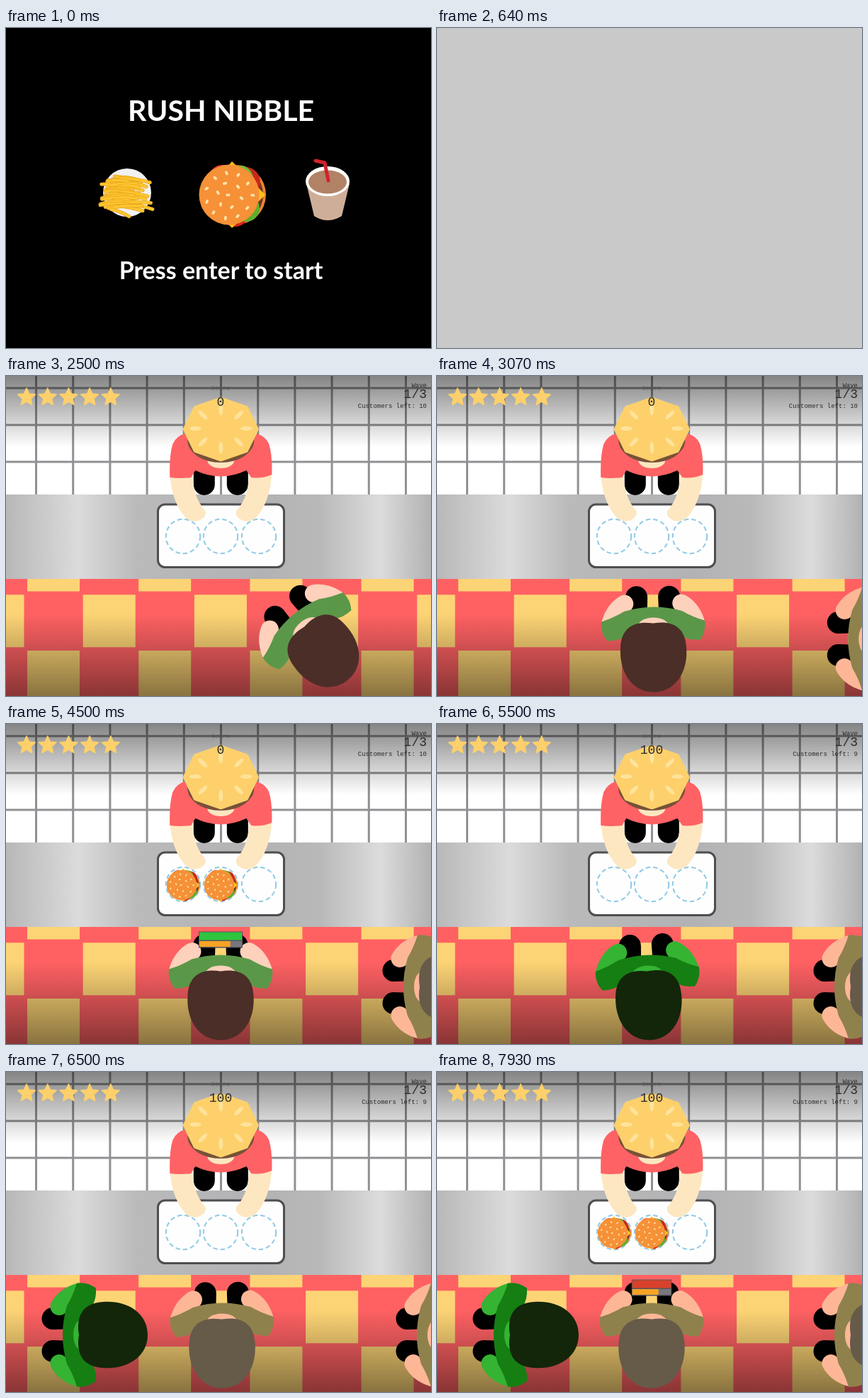
An HTML page that plays this animation: 600x451 px, repeating every 8000 ms.

```html
<!DOCTYPE html>
<html lang="en">
<head>
<meta charset="utf-8">
<title>Burger counter</title>
<style>
html, body { margin: 0; width: 100%; height: 100%; overflow: hidden; background: #000; }
svg { display: block; width: 600px; height: 451px; }
.head { font-family: Lato, sans-serif; font-weight: 700; fill: #fff; text-anchor: middle; }
.hud { font-family: "Liberation Mono", monospace; fill: #2c2c2c; font-size: 9px; }
.hud .big { font-size: 18px; }
.right { text-anchor: end; }
.mid { text-anchor: middle; }
.skin { fill: var(--skin); }
.arm { stroke: var(--skin); stroke-width: 25; stroke-linecap: round; fill: none; }
.shirt { fill: var(--shirt); }
.hair { fill: var(--hair); }
</style>
</head>
<body>
<svg viewBox="0 0 600 451">
  <defs>
    <linearGradient id="steel">
      <stop offset="0" stop-color="#b8b8b9"/>
      <stop offset=".17" stop-color="#dbdbdc"/>
      <stop offset=".31" stop-color="#bababb"/>
      <stop offset=".6" stop-color="#b2b2b4"/>
      <stop offset=".74" stop-color="#b9b9ba"/>
      <stop offset=".88" stop-color="#dcdcdd"/>
      <stop offset="1" stop-color="#b2b2b3"/>
    </linearGradient>
    <linearGradient id="topShade" x2="0" y2="1">
      <stop offset="0" stop-opacity=".48"/>
      <stop offset="1" stop-opacity="0"/>
    </linearGradient>
    <linearGradient id="floorShade" x2="0" y2="1">
      <stop offset="0" stop-opacity="0"/>
      <stop offset="1" stop-opacity=".46"/>
    </linearGradient>
    <clipPath id="floorClip"><path d="M0 286H600V451H0Z"/></clipPath>

    <g id="burger">
      <circle cx="6" r="42" fill="#e88634"/>
      <circle cx="3" r="41" fill="#6d3520"/>
      <circle cx="-14" cy="-24" r="18" fill="#d8261f"/>
      <circle cx="19" cy="-18" r="21" fill="#c9281d"/>
      <circle cx="4" cy="25" r="20" fill="#d8261f"/>
      <circle cx="11" cy="-22" r="19" fill="#6cc235"/>
      <circle cx="20" cy="19" r="19" fill="#5fae2e"/>
      <path d="M0-47L47 0L0 47L-40 0Z" fill="#ffbe1e"/>
      <circle cx="-4" r="42.5" fill="#f69137"/>
      <g id="seeds" stroke="#fde3a8" stroke-width="3.6" stroke-linecap="round"/>
    </g>

    <g id="fries">
      <circle r="34" fill="#f1f1f3"/>
      <g id="sticks" fill="none" stroke-linecap="round"/>
    </g>

    <g id="drink">
      <path d="M-30-13L-19 33Q0 45 20 33L31-13Z" fill="#cfae99"/>
      <ellipse cy="-16" rx="31" ry="21" fill="#fff"/>
      <ellipse cy="-15" rx="27" ry="16.500" fill="#b28266"/>
      <path d="M-17-45L-4-42L1-17" fill="none" stroke="#d2222b" stroke-width="5" stroke-linejoin="round" stroke-linecap="round"/>
    </g>

    <g id="guest">
      <path d="M-23-59L-24-28M23-59L24-28" stroke="#000" stroke-width="31" stroke-linecap="round"/>
      <path class="arm" d="M-40-50Q-54-42-60-24M40-50Q54-42 60-24"/>
      <path class="shirt" d="M-65 2Q-75-10-73-25Q-56-30-41-39Q0-51 41-39Q56-30 73-25Q75-10 66 2Q50 3 40-4L-40-4Q-50 3-65 2Z"/>
      <ellipse class="skin" cy="-19" rx="21" ry="11"/>
      <path class="hair" d="M0-22C25-26 45-18 46.500 12C49 46 31 75 0 75C-31 75-49 46-46.500 12C-45-18-25-26 0-22Z"/>
    </g>
  </defs>

  <g id="scene">
    <rect width="600" height="168" fill="#fff"/>
    <path id="grout" stroke="#919195" stroke-width="3"/>
    <rect width="600" height="100" fill="url(#topShade)"/>
    <rect y="167" width="600" height="119" fill="url(#steel)"/>
    <g clip-path="url(#floorClip)">
      <rect y="286" width="600" height="165" fill="#ff6163"/>
      <path id="checks" fill="#fdd475"/>
      <rect y="335" width="600" height="116" fill="url(#floorShade)"/>
    </g>

    <rect x="214.500" y="181" width="178" height="88.500" rx="10" fill="#fefefe" stroke="#4e4e51" stroke-width="3"/>
    <g id="slots" fill="none" stroke="#8fc9e6" stroke-width="2" stroke-dasharray="6.500 4"/>
    <g id="food"></g>

    <g transform="translate(303.300 0)">
      <path d="M-23.500 130V153M23.500 130V153" stroke="#000" stroke-width="30" stroke-linecap="round"/>
      <g id="arms" fill="#fde7c1">
        <path id="armL" d="M-72 136Q-70 176-51 198Q-43 207-32 204Q-19 199-22 190Q-40 170-40 136Z"/>
        <use href="#armL" transform="scale(-1 1)"/>
      </g>
      <path d="M-72 143Q-73 112-68 96Q-62 82-44 80H44Q62 82 68 96Q73 112 72 139Q58 145 43 143L36 133Q0 150-36 133L-42 143Q-58 145-72 143Z" fill="#ff6264"/>
      <ellipse cy="119" rx="19" ry="11" fill="#fde7c1"/>
      <ellipse cy="91" rx="47" ry="31" fill="#775138"/>
      <path id="hat" fill="#fdd06b" stroke="#fdd06b" stroke-width="5" stroke-linejoin="round"/>
      <g id="folds" fill="#ffe39b"></g>
    </g>

    <g id="stars" fill="#fdd06b" stroke="#fdd06b" stroke-linejoin="round"></g>
    <g class="hud">
      <text class="mid" x="303" y="20" fill-opacity=".3">Score</text>
      <text class="mid big" id="score" x="303" y="42">0</text>
      <text class="right" x="594" y="16">Wave</text>
      <text class="right big" x="594" y="31">1/3</text>
      <text class="right" id="left" x="594" y="45">Customers left: 10</text>
    </g>

    <g id="guests"></g>
    <g id="meter">
      <rect x="-31" y="-11.500" width="62" height="23" fill="#56565c"/>
      <rect id="mood" x="-30" y="-10.500" width="60" height="11"/>
      <rect x="-30" y="2" width="60" height="8" fill="#77777d"/>
      <rect id="wait" x="-30" y="2" height="8" fill="#f7a325"/>
    </g>
  </g>

  <rect id="blank" width="600" height="451" fill="#c9c9c9"/>
  <g id="title">
    <rect width="600" height="451"/>
    <text class="head" x="303.500" y="131" font-size="41">RUSH NIBBLE</text>
    <use href="#fries" x="171" y="232"/>
    <use href="#burger" x="319" y="235"/>
    <use href="#drink" x="454" y="232"/>
    <text class="head" x="303.500" y="354" font-size="34">Press enter to start</text>
  </g>
</svg>
<script>
const $ = id => document.getElementById(id);
const range = n => [...Array(n).keys()];

function add(parent, tag, attrs) {
  const el = document.createElementNS("http://www.w3.org/2000/svg", tag);
  for (const k in attrs) el.setAttribute(k, attrs[k]);
  return $(parent).appendChild(el);
}

function polygon(n, rx, ry, cx = 0, cy = 0, inner = 1) {
  return "M" + range(n).map(i => {
    const a = i / n * 2 * Math.PI, k = i % 2 ? inner : 1;
    return [cx + rx * k * Math.sin(a), cy - ry * k * Math.cos(a)].map(v => v.toFixed(1));
  }).join("L") + "Z";
}

let seed = 7;
const rand = () => (seed = seed * 16807 % 2147483647) / 2147483647;

// Static scenery
$("grout").setAttribute("d",
  range(12).map(i => `M${42.5 + i * 52.2} 0V167`).join("") +
  range(3).map(i => `M0 ${17 + i * 52}H600`).join(""));
$("checks").setAttribute("d", range(3).map(r => range(5).map(c =>
  `M${(r % 2 ? -48.5 : 30) + c * 157.2} ${229.5 + r * 78.7}h74v74h-74z`).join("")).join(""));
for (const x of [250, 303, 357]) add("slots", "circle", { cx: x, cy: 226, r: 24.2 });
for (const i of range(5))
  add("stars", "path", { d: polygon(10, 13, 13, 29 + i * 29.7, 30, .47), "stroke-width": 1.5 });

$("hat").setAttribute("d", polygon(8, 51, 43, 0, 75));
for (const i of range(8)) {
  const a = i * 45, t = a * Math.PI / 180;
  const x = 36 * Math.sin(t), y = 74 - 27 * Math.cos(t);
  add("folds", "ellipse", { rx: 3, ry: 8.5, transform: `translate(${x} ${y}) rotate(${a})` });
}

// Sesame seeds in rings, chips in slanted rows
for (const [n, r] of [[1, 3], [6, 17], [11, 32]])
  for (const i of range(n)) {
    const a = i / n * 6.283 + r, t = rand() * 3.14;
    const x = -4 + r * Math.cos(a), y = r * Math.sin(a);
    add("seeds", "path", { d: `M${x} ${y}l${2.6 * Math.cos(t)} ${2.6 * Math.sin(t)}` });
  }
for (const i of range(34)) {
  const y = -23 + i * 1.4, x = -38 + rand() * 30, w = 26 + rand() * 24, s = -5 + rand() * 17;
  const end = Math.min(w, 42 - x);
  const d = `M${x} ${y}q${end / 2} ${s / 2 - 3} ${end} ${s}`;
  add("sticks", "path", { d, stroke: "#e9a41e", "stroke-width": 5 });
  add("sticks", "path", { d, stroke: "#fdc62f", "stroke-width": 3.6 });
}

// Food on the tray: shape, x, shown from, shown until
const dishes = [
  ["burger", 250, 3920, 5490], ["burger", 303, 4340, 5490], ["drink", 357, 4920, 5490],
  ["burger", 250, 7350, 8000], ["burger", 303, 7775, 8000]
].map(([name, x, from, to]) => ({
  from, to, el: add("food", "use", { href: "#" + name, transform: `translate(${x} 227) scale(.5)` })
}));

const looks = {
  green: ["#fdd1bb", "#5b9749", "#4a2e27"],
  khaki: ["#fdb797", "#8f814c", "#665a49"],
  happy: ["#35b332", "#157f13", "#13260a"]
};

// Moves: start, duration, x from, x to, turn from, turn to
const guests = [
  { look: "green", happyAt: 5490, moves: [[2160, 1000, 606, 303, -90, 0], [5490, 705, 303, 125, 0, -90]] },
  { look: "khaki", moves: [[2575, 1000, 682, 606, -90, -90], [5580, 1000, 606, 303, -90, 0]] },
  { look: "khaki", moves: [[6000, 1000, 682, 606, -90, -90]] }
];
for (const g of guests) g.el = add("guests", "use", { href: "#guest" });

const meters = [
  { from: 3205, to: 5490, size: 1, rate: .21, color: "#31c43f" },
  { from: 6635, to: 8000, size: .91, rate: .25, color: "#d8412b" }
];

const easeOut = u => 1 - (1 - u) ** 2;
const show = (el, on) => el.setAttribute("visibility", on ? "inherit" : "hidden");

function drawGuest(g, t) {
  const [start, dur, x0, x1, r0, r1] = g.moves.findLast(m => t >= m[0]) || g.moves[0];
  const p = easeOut(Math.min(1, Math.max(0, (t - start) / dur)));
  g.el.setAttribute("transform",
    `translate(${x0 + (x1 - x0) * p} 370.500) rotate(${r0 + (r1 - r0) * p})`);
  const [skin, shirt, hair] = looks[t >= g.happyAt ? "happy" : g.look];
  g.el.style.cssText = `--skin:${skin};--shirt:${shirt};--hair:${hair}`;
}

function drawMeter(t) {
  const m = meters.find(m => t >= m.from && t < m.to);
  show($("meter"), m);
  if (!m) return;
  const pop = m.size * Math.min(1, .6 + (t - m.from) / 500);
  $("meter").setAttribute("transform", `translate(303 304) scale(${pop} 1)`);
  $("mood").setAttribute("fill", m.color);
  $("wait").setAttribute("width", 60 * (1 - m.rate * (t - m.from) / 1000));
}

function draw(t) {
  $("title").setAttribute("opacity", t < 499 ? 1 : t < 630 ? .5 : 0);
  show($("blank"), t < 2200);
  show($("scene"), t >= 2200);
  guests.forEach(g => drawGuest(g, t));
  dishes.forEach(d => show(d.el, t >= d.from && t < d.to));
  drawMeter(t);
  const served = t >= 5490;
  $("score").textContent = served ? 100 : 0;
  $("left").textContent = "Customers left: " + (served ? 9 : 10);
}

// Motion advances seven times a second
const step = 1000 / 7;
const begin = performance.now();
function tick() {
  const t = Math.max(0, performance.now() - begin) % 8000;
  draw(t < 500 ? t : 500 + Math.floor((t - 492) / step) * step);
  requestAnimationFrame(tick);
}
tick();
</script>
</body>
</html>
```
